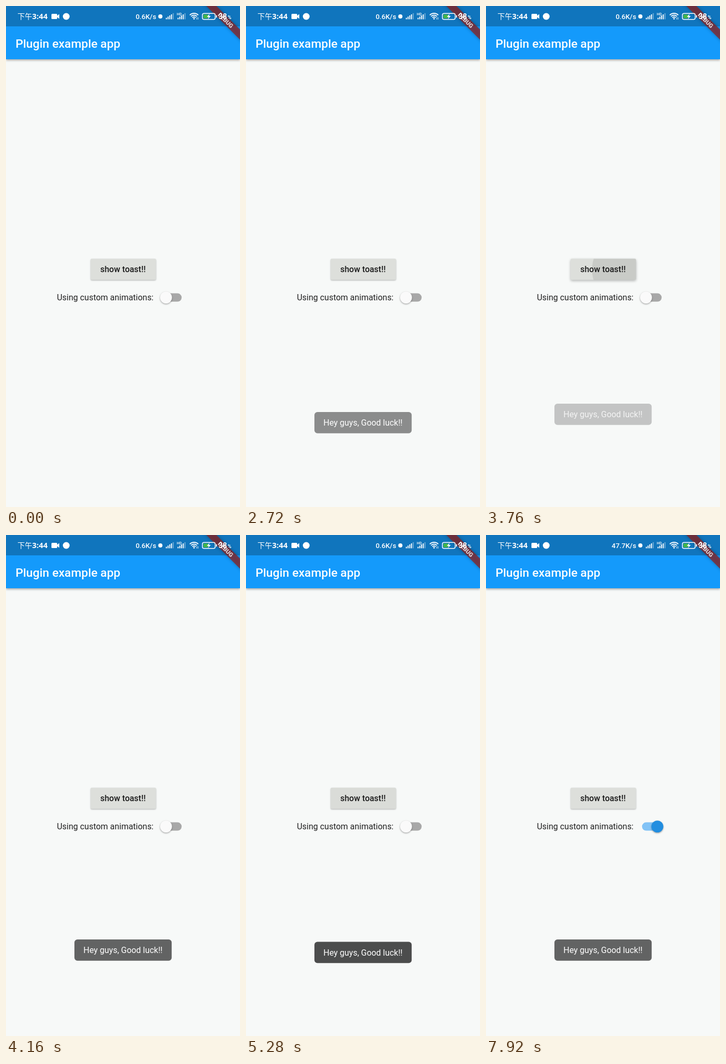
Write an HTML page with a canvas that moves like this. It is 448 by 960 pixels and loops after 8000 ms.

```html
<!DOCTYPE html>
<html lang="en">
<head>
<meta charset="utf-8">
<title>Toast demo</title>
<style>
  html, body { margin: 0; width: 100%; height: 100%; overflow: hidden; background: #f7f9f8; }
  canvas { display: block; width: 100vw; height: 100vh; }
</style>
</head>
<body>
<canvas id="stage" width="448" height="960"></canvas>
<script>
const ctx = document.getElementById('stage').getContext('2d');
const LOOP = 8000, STEP = 80;
const ENTER = 400;
const SPEED_CHANGE = 7280;
const TOGGLE = { start: 7560, length: 200 };
const FONT = 'Roboto, sans-serif';
const BODY = 15.97, HEADING = 22.81;

// Each tap: when its toast appears, and how long before that its ripple began.
const TAPS = [
  { show: 1960, lead: 96 },
  { show: 2556, lead: 400 },
  { show: 3656, lead: 96 },
  { show: 4408, lead: 96 },
  { show: 4972, lead: 96 }
];
const TOAST_ALPHA = [[0, 0], [0.26, 0.21], [0.41, 0.44], [0.58, 0.565], [0.77, 0.69], [1, 0.6]];

const clamp = v => Math.max(0, Math.min(1, v));
const mix = (a, b, p) => a + (b - a) * p;
const easeInOut = p => p * p * (3 - 2 * p);
const easeOutBack = p => 1 + 2.70158 * (p - 1) ** 3 + 1.70158 * (p - 1) ** 2;
const mixColor = (a, b, p) => `rgb(${a.map((v, i) => Math.round(mix(v, b[i], p)))})`;
const black = a => `rgba(0,0,0,${a})`;

function along(points, p) {
  for (let i = 1; i < points.length; i++) {
    const [x0, y0] = points[i - 1], [x1, y1] = points[i];
    if (p <= x1) return mix(y0, y1, (p - x0) / (x1 - x0));
  }
  return points[points.length - 1][1];
}

function shadow(color, blur, dy) {
  ctx.shadowColor = color;
  ctx.shadowBlur = blur;
  ctx.shadowOffsetY = dy;
}

function noShadow() {
  shadow('transparent', 0, 0);
}

function rect(x, y, w, h, r, fill) {
  ctx.beginPath();
  ctx.roundRect(x, y, w, h, r);
  ctx.fillStyle = fill;
  ctx.fill();
}

function circle(x, y, r, fill) {
  ctx.beginPath();
  ctx.arc(x, y, r, 0, Math.PI * 2);
  ctx.fillStyle = fill;
  ctx.fill();
}

function polygon(points, fill) {
  ctx.beginPath();
  points.forEach(([x, y]) => ctx.lineTo(x, y));
  ctx.closePath();
  ctx.fillStyle = fill;
  ctx.fill();
}

function text(str, x, y, size, weight, fill, align = 'left', family = FONT) {
  ctx.font = `${weight} ${size}px ${family}`;
  ctx.textAlign = align;
  ctx.fillStyle = fill;
  ctx.fillText(str, x, y);
}

function signal(x, bars) {
  for (let i = 0; i < 5; i++) {
    const h = 3 + i * 2.2;
    rect(x + i * 3.3, 25.5 - h, 1.9, h, 0.5, i < bars ? '#fff' : 'rgba(255,255,255,.4)');
  }
}

function wifi(x, y) {
  ctx.strokeStyle = '#fff';
  ctx.lineWidth = 1.8;
  for (const r of [4.5, 8, 11.5]) {
    ctx.beginPath();
    ctx.arc(x, y, r, -Math.PI * 0.75, -Math.PI * 0.25);
    ctx.stroke();
  }
  circle(x, y - 1, 1.4, '#fff');
  rect(x + 4.5, y - 4, 1.2, 4.5, 0, 'rgba(255,255,255,.7)');
  rect(x + 7, y - 4, 1.2, 4.5, 0, 'rgba(255,255,255,.7)');
}

function battery() {
  ctx.strokeStyle = '#fff';
  ctx.lineWidth = 1.5;
  ctx.beginPath();
  ctx.roundRect(376, 14.3, 24.5, 11.4, 3);
  ctx.stroke();
  rect(402, 17.5, 1.8, 5, 0.8, '#fff');
  rect(378, 16.2, 9, 7.6, 1, '#43b649');
  polygon([[390, 14.5], [384.5, 21], [388, 21], [386.5, 25.5], [392, 19], [388.5, 19]], '#fff');
  text('38', 407, 25, 14, 600, '#fff');
  text('%', 424.5, 25, 9.5, 600, '#fff');
}

function statusIcons(t) {
  text('下午', 22, 25, 14, 500, '#fff', 'left', '"Noto Sans CJK SC", "Noto Sans CJK", sans-serif');
  text('3:44', 50, 25, 14.8, 600, '#fff', 'left', '"Noto Sans", sans-serif');
  rect(87, 15, 11, 10, 1.5, '#fff');
  polygon([[97.5, 19], [102, 15.5], [102, 24.5], [97.5, 21]], '#fff');
  circle(115.3, 20, 6.5, '#fff');
  text(t < SPEED_CHANGE ? '0.6K/s' : '47.7K/s', 287.5, 25, 13.3, 500, '#fff', 'right');
  circle(295.5, 20, 4, '#fff');
  signal(306, 4);
  signal(328.5, 4);
  text('HD', 327, 18, 7, 500, '#fff');
  wifi(360, 25.5);
  battery();
}

function appBar() {
  shadow(black(0.34), 4, 1.5);
  rect(0, 39, 448, 63, 0, '#149afb');
  noShadow();
  rect(0, 0, 448, 39, 0, '#1075bd');
  text('Plugin example app', 18.2, 79.5, HEADING, 500, '#fff');
}

function debugBanner() {
  ctx.save();
  ctx.translate(448, 0);
  ctx.rotate(Math.PI / 4);
  shadow(black(0.4), 6, 0);
  rect(-70, 31.9, 140, 13.7, 0, 'rgba(142,34,34,.74)');
  noShadow();
  text('DEBUG', 0, 42.8, 11.2, 900, 'rgba(255,255,255,.8)', 'center');
  ctx.restore();
}

function button(t) {
  const ripples = TAPS.map(tap => t - tap.show + tap.lead).filter(age => age >= 0 && age < 450);
  const raised = ripples.some(age => age < 300);
  shadow(black(raised ? 0.28 : 0.26), raised ? 5 : 2.5, raised ? 2 : 1.2);
  rect(162, 484.3, 125.2, 40.4, 2.3, '#dddfdb');
  noShadow();

  ctx.save();
  ctx.beginPath();
  ctx.roundRect(162, 484.3, 125.2, 40.4, 2.3);
  ctx.clip();
  for (const age of ripples) {
    const fade = 1 - clamp((age - 200) / 250);
    circle(271, 505, 10 + 58 * (age / 200) ** 2, black(0.09 * fade));
  }
  ctx.restore();
  text('show toast!!', 224, 510, BODY, 500, '#1c1c1c', 'center');
}

function toggle(t) {
  text('Using custom animations:', 97.5, 564, BODY, 400, '#222');
  const p = easeInOut(clamp((t - TOGGLE.start) / TOGGLE.length));
  rect(298.7, 550.6, 37.6, 16, 8, mixColor([168, 168, 168], [130, 195, 246], p));
  shadow(black(0.36), 3, 1.3);
  circle(mix(306.4, 328.1, p), 558.6, 11.4, mixColor([250, 250, 250], [34, 142, 224], p));
  noShadow();
}

function toast(t) {
  const tap = TAPS.filter(item => item.show <= t).pop();
  if (!tap) return;
  const p = clamp((t - tap.show) / ENTER);
  const alpha = along(TOAST_ALPHA, p);
  const y = 775 - 80 * (1 - easeOutBack(p));
  rect(131, y, 186.2, 40.7, 5.7, black(alpha));
  const ink = alpha && clamp(alpha * 2 + 0.4);
  text('Hey guys, Good luck!!', 224, y + 26, BODY, 400, `rgba(255,255,255,${ink})`, 'center');
}

function draw(t) {
  rect(0, 0, 448, 960, 0, '#f7f9f8');
  appBar();
  button(t);
  toggle(t);
  toast(t);
  debugBanner();
  statusIcons(t);
}

const began = performance.now();
function tick() {
  const t = (performance.now() - began) % LOOP;
  draw(Math.floor(t / STEP) * STEP);
  requestAnimationFrame(tick);
}
tick();
</script>
</body>
</html>
```
